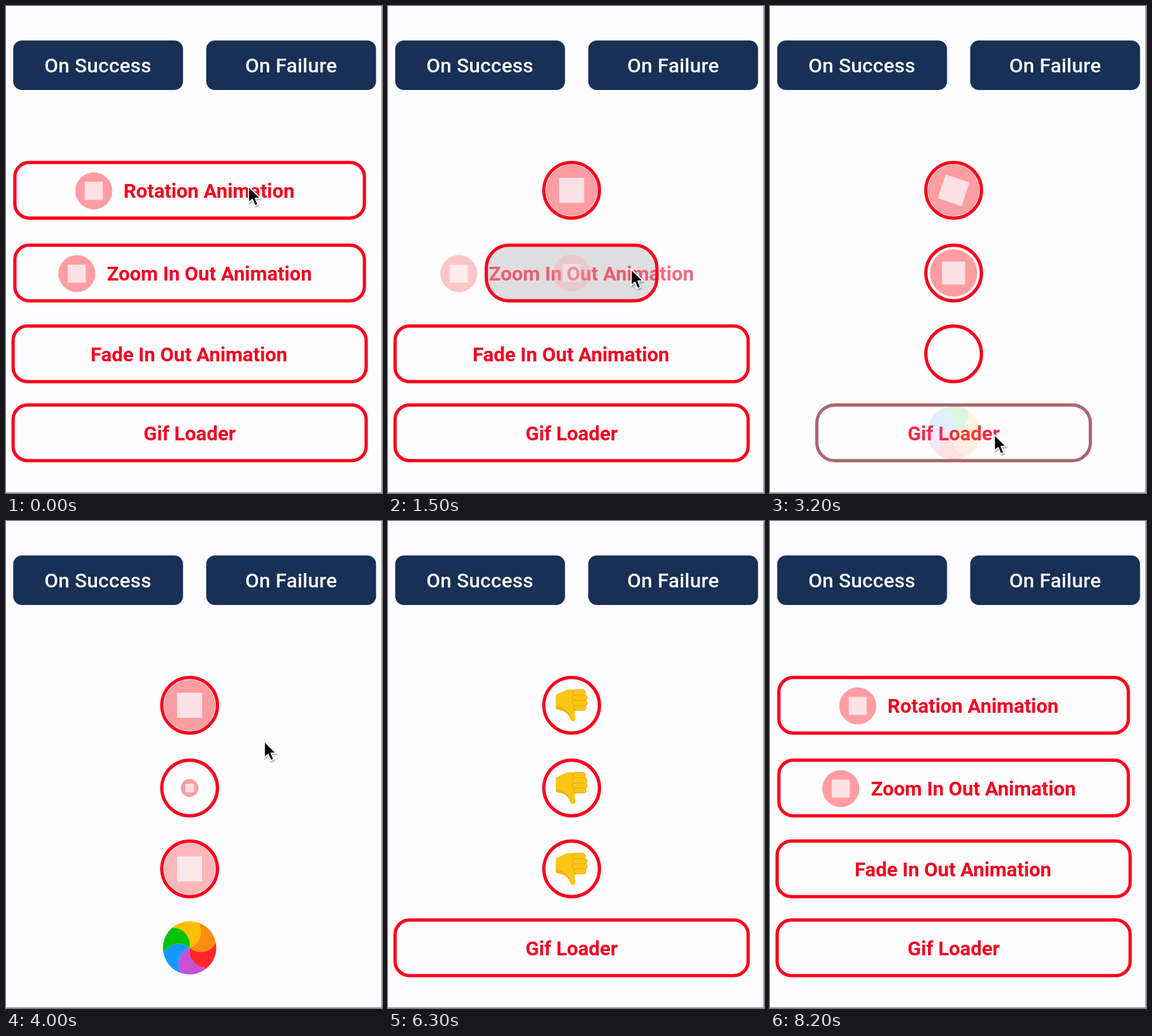
These frames come from a looping animation (600x777 px, 8300 ms). An HTML page:

```html
<!DOCTYPE html>
<html lang="en">
<head>
<meta charset="utf-8">
<title>Loading buttons</title>
<style>
html, body { margin: 0; width: 100%; height: 100%; overflow: hidden; background: #fdfcfe; }
svg { display: block; width: 600px; height: 777px; }
text { font-family: Roboto, sans-serif; text-anchor: middle; }
.nav rect { fill: #183055; }
.nav text { font-size: 32px; font-weight: 500; letter-spacing: .2px; fill: #fff; }
.label { font-size: 31.5px; font-weight: 700; fill: #f5001f; }
.ring { stroke-width: 5.2; }
.cursor { filter: drop-shadow(1px 2px 1px rgba(0, 0, 0, .35)); }
</style>
</head>
<body>
<svg id="stage" viewBox="0 0 600 777">
  <defs>
    <g id="badge">
      <circle r="41" fill="#fe9da2"/>
      <rect x="-20" y="-20" width="40" height="40" fill="#fce1e4"/>
    </g>
    <g id="thumb">
      <path d="M-25-17Q-17-20-10-24Q-5-26 4-25L8 7Q4 9 5 15L6 23Q4 27 0 25Q-3 23-4 17Q-10 9-17 8L-25 6Q-26-6-25-17Z" fill="#fdc613"/>
      <path d="M-4 17Q-10 9-17 8L-25 6V1Q-8 2 0 22Z" fill="#f1b010"/>
      <g fill="#fdc613" stroke="#e6a012" stroke-width="1">
        <rect x="2" y="-25" width="20" height="9" rx="4.5"/>
        <rect x="1" y="-16.5" width="24" height="9" rx="4.5"/>
        <rect x="1" y="-8" width="24" height="9" rx="4.5"/>
        <rect x="3" y="0" width="20" height="8" rx="4"/>
      </g>
    </g>
    <g id="wheel"></g>
  </defs>
  <rect width="600" height="777" fill="#fdfcfe"/>
  <path d="M599.5 0V777M0 776.5H600" stroke="#858388" fill="none"/>
  <g class="nav">
    <rect x="11.5" y="55" width="271" height="79" rx="14"/>
    <text x="146.7" y="105.5">On Success</text>
    <rect x="319.5" y="55" width="271" height="79" rx="14"/>
    <text x="455" y="105.5">On Failure</text>
  </g>
  <g id="buttons"></g>
  <path id="cursor" class="cursor" d="M0 0V26L6 20.5 10.3 30.5 15 28.5 10.8 18.7H19Z"
        fill="#000" stroke="#fff" stroke-width="1.8" stroke-linejoin="round"/>
</svg>
<script>
const LOOP = 8300, STEP = 100, MORPH = 500, FAILED = 5400, RESET = 7300, CX = 293;
const $ = id => document.getElementById(id);
const clamp = v => Math.min(1, Math.max(0, v));
const mix = (a, b, p) => a + (b - a) * p;
const ease = p => (1 - Math.cos(Math.PI * p)) / 2;
const wave = (t, half) => Math.abs(1 - (t / half) % 2);

function set(node, attrs) {
  for (const k in attrs) node.setAttribute(k, attrs[k]);
  return node;
}
function add(parent, tag, attrs) {
  return parent.appendChild(set(document.createElementNS('http://www.w3.org/2000/svg', tag), attrs));
}

// Pinwheel: six curved petals
['#ffbf00', '#ff8c12', '#ff2828', '#c650d6', '#119aff', '#05c308'].forEach((fill, i) => {
  const rim = deg => {
    const a = deg * Math.PI / 180;
    return `${42.5 * Math.cos(a)} ${42.5 * Math.sin(a)}`;
  };
  const a = 193 + 60 * i;
  add($('wheel'), 'path', {
    d: `M0 0A27 27 0 0 0 ${rim(a)}A42.5 42.5 0 0 1 ${rim(a + 60)}A27 27 0 0 1 0 0Z`, fill
  });
});

const buttons = [
  { text: 'Rotation Animation', tx: 324, y: 294, half: 281.5, start: 250, back: RESET, icon: 140,
    pose: t => ({ turn: -.36 * (t - 250) }) },
  { text: 'Zoom In Out Animation', tx: 324.5, y: 426, half: 281.5, start: 1215, back: RESET, icon: 113,
    pose: t => ({ size: .93 * mix(.2, 1, wave(t - 1215, 1000)) }) },
  { text: 'Fade In Out Animation', tx: 292, y: 555, half: 284.3, start: 2106, back: RESET,
    pose: t => ({ alpha: wave(t - 2106, 1100) }) },
  { text: 'Gif Loader', tx: 293, y: 681, half: 284.3, start: 3027, back: FAILED, wheel: true,
    pose: t => ({ turn: .36 * (t - 4900) }) }
];

for (const b of buttons) {
  const g = add($('buttons'), 'g', {});
  b.ring = add(g, 'rect', { class: 'ring' });
  if (b.icon) b.side = add(g, 'use', { href: '#badge', transform: `translate(${b.icon} ${b.y + 1}) scale(.72)` });
  b.label = add(g, 'text', { class: 'label', x: b.tx, y: b.y + 11.5 });
  b.label.textContent = b.text;
  b.loader = add(g, 'use', { href: b.wheel ? '#wheel' : '#badge' });
  if (!b.wheel) b.thumb = add(g, 'use', { href: '#thumb', transform: `translate(${CX} ${b.y})` });
}

function drawButton(b, t) {
  const into = clamp((t - b.start) / MORPH);
  const x = into - clamp((t - b.back) / MORPH);
  const p = ease(x);
  const half = mix(b.half, 47, p) - 2.6;
  const press = .12 * clamp(1 - Math.abs(into - .57) / .17);
  const grey = b.wheel ? clamp(2.1 * p) : 0;
  const rgb = [[252, 50], [0, 90], [28, 85]].map(c => Math.round(mix(c[0], c[1], grey)));
  set(b.ring, {
    x: CX - half, y: b.y - 44.4, width: 2 * half, height: 88.8, rx: mix(23, 44.4, p),
    fill: `rgba(0,0,0,${press})`, stroke: `rgb(${rgb})`, 'stroke-opacity': b.wheel ? 1 - p : 1
  });
  const rest = clamp(1 - 1.3 * x * x);
  set(b.label, { opacity: rest });
  if (b.side) set(b.side, { opacity: rest });

  const failed = b.thumb && t >= FAILED;
  const { turn = 0, size = 1, alpha = 1 } = b.pose(Math.max(t, b.start));
  set(b.loader, {
    transform: `translate(${CX} ${b.y}) rotate(${turn}) scale(${size})`,
    opacity: failed ? 0 : alpha * x * x
  });
  if (b.thumb) set(b.thumb, { opacity: failed ? x * x : 0 });
}

// Cursor stops: time, x, y
const path = [
  [0, 387, 288], [600, 387, 288], [1100, 388, 420], [1600, 388, 420], [2050, 357, 540],
  [2350, 357, 540], [2900, 358, 684], [3400, 358, 684], [4500, 453, 102], [5400, 453, 102], [5800, 625, 150]
];
function drawCursor(t) {
  const i = path.findIndex(s => s[0] > t);
  const [a, b] = i < 0 ? [path.at(-1), path.at(-1)] : [path[i - 1], path[i]];
  const p = i < 0 ? 0 : ease((t - a[0]) / (b[0] - a[0]));
  set($('cursor'), { transform: `translate(${mix(a[1], b[1], p)} ${mix(a[2], b[2], p)})` });
}

const began = performance.now();
function frame() {
  const t = Math.floor((performance.now() - began) % LOOP / STEP) * STEP;
  buttons.forEach(b => drawButton(b, t));
  drawCursor(t);
  requestAnimationFrame(frame);
}
frame();
</script>
</body>
</html>
```
